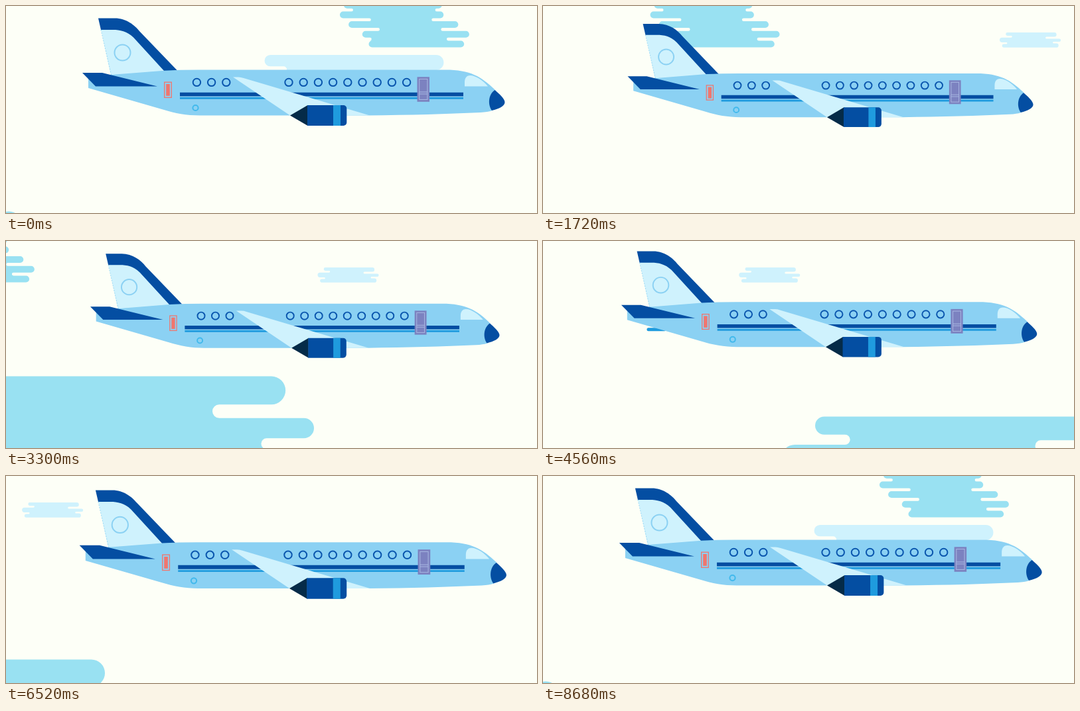
An HTML page with a canvas that plays this animation: 800x313 px, repeating every 8.7 s.

```html
<!DOCTYPE html>
<html lang="en">
<head>
<meta charset="utf-8">
<title>Plane in flight</title>
<style>
html, body { margin: 0; width: 100%; height: 100%; overflow: hidden; background: #fdfff7; }
canvas { display: block; }
</style>
</head>
<body>
<canvas id="stage" width="800" height="313"></canvas>
<script>
const ctx = document.getElementById('stage').getContext('2d');
const LOOP = 8700, TURN = Math.PI / 2;
const SKY = '#8bd1f3', NAVY = '#044ea2', BLUE = '#1f9bde', PALE = '#cff2fd', AQUA = '#99e1f2';

// Signed distance from a moment, wrapped around the loop
const since = (t, at) => ((t - at + LOOP * 1.5) % LOOP) - LOOP / 2;

// Each side lists [edge x, height] from top to bottom, bulges alternating with notches
function cloudShape(right, left) {
  const path = new Path2D();
  let y = 0;
  right.forEach(([x, h], i) => {
    const r = h / 2, notch = i % 2 === 1;
    path.arc(notch ? x + r : x - r, y + r, r, -TURN, TURN, notch);
    y += h;
  });
  [...left].reverse().forEach(([x, h], i) => {
    const r = h / 2, notch = i % 2 === 1;
    y -= h;
    path.arc(notch ? x - r : x + r, y + r, r, TURN, notch ? -TURN : 3 * TURN, notch);
  });
  path.closePath();
  return path;
}

// Five even rows whose ends swing along a cosine
function raggedShape() {
  const right = [], left = [];
  for (let i = 0; i < 5; i++) {
    const r = 174 - 22 * Math.cos(Math.PI * (i - 0.4) / 2.8);
    const l = 22 - 22 * Math.cos(Math.PI * (i - 0.8) / 3.2);
    right.push([r, 10.1]);
    left.push([l, 10.1]);
    if (i < 4) {
      right.push([r - 10 - 8 * i, 4.6]);
      left.push([l + 14 + 38 * Math.sin(Math.PI * i / 3), 4.6]);
    }
  }
  return cloudShape(right, left);
}

const ragged = raggedShape();
const puff = cloudShape(
  [[279, 21], [225, 10], [300, 15], [261, 8], [289, 20]],
  [[30, 16], [61, 9], [0, 24], [37, 8], [12, 17]]);

// x is the left edge at the moment `at`; speed in px per ms
const behind = [
  { shape: ragged, color: AQUA, at: 0, x: 502.5, y: -6.4, speed: 0.1985 },
  { shape: puff, color: PALE, at: 4135, x: 354, y: 40, speed: 0.1383, size: 0.307 },
  { shape: puff, color: PALE, at: 0, x: 357, y: 74, speed: 0.95, size: 1.084 }
];
const ahead = [
  { shape: puff, color: SKY, at: 5820, x: 191, y: 10.5, speed: 1.3 },
  { shape: puff, color: AQUA, at: 3300, x: -148, y: 204.5, speed: 1.6, size: 2.04 },
  { shape: puff, color: AQUA, at: 4560, x: 359, y: 265.5, speed: 1.6, size: 1.7 },
  { shape: puff, color: AQUA, at: 5820, x: 725, y: 277.5, speed: 1.6, size: 1.95 }
];

// Key plane poses: time, x, y, scale
const poses = [
  [0, 0, 0, 1], [1720, 17.1, 9.3, 0.96], [3300, 15.6, 1.4, 0.9686],
  [4560, 4.8, -2.7, 0.984], [5820, -4, 1.5, 1], [7500, -5.3, 3.2, 1.0204]
];

// Smooth periodic curve through the key poses
function poseAt(t) {
  const n = poses.length;
  const key = i => {
    const [at, ...pose] = poses[(i + n) % n];
    return [at + Math.floor(i / n) * LOOP, ...pose];
  };
  const i = poses.findLastIndex(p => p[0] <= t);
  const [a, b, c, d] = [key(i - 1), key(i), key(i + 1), key(i + 2)];
  const span = c[0] - b[0], u = (t - b[0]) / span, v = 1 - u;
  return [1, 2, 3].map(k => {
    const m0 = (c[k] - a[k]) / (c[0] - a[0]) * span;
    const m1 = (d[k] - b[k]) / (d[0] - b[0]) * span;
    return v * v * (b[k] * (1 + 2 * u) + m0 * u) + u * u * (c[k] * (1 + 2 * v) - m1 * v);
  });
}

function fill(color, d) {
  ctx.fillStyle = color;
  ctx.fill(new Path2D(d));
}
function box(color, x, y, w, h, radii = 0) {
  ctx.fillStyle = color;
  ctx.beginPath();
  ctx.roundRect(x, y, w, h, radii);
  ctx.fill();
}
function frame(color, x, y, w, h, line = 1) {
  ctx.strokeStyle = color;
  ctx.lineWidth = line;
  ctx.strokeRect(x, y, w, h);
}
function ring(color, x, y, r) {
  ctx.strokeStyle = color;
  ctx.lineWidth = 2;
  ctx.beginPath();
  ctx.arc(x, y, r, 0, 4 * TURN);
  ctx.stroke();
}

function drawCloud(c, t) {
  const size = c.size || 1;
  ctx.save();
  ctx.translate(c.x - c.speed * since(t, c.at), c.y);
  ctx.scale(size, size);
  ctx.fillStyle = c.color;
  ctx.fill(c.shape);
  ctx.restore();
}

// Wind streaks slip out from behind the plane and shrink away
function drawStreaks(t) {
  for (let i = 0; i < 7; i++) {
    const dt = since(t, 4780 + 490 * i);
    const len = 16 - dt * 0.06, h = Math.min(5, len);
    if (dt < -400 || len <= 0) continue;
    const y = 85 + 80 * ((0.61 + 0.618 * i) % 1);
    box(BLUE, 105 - dt * 0.3 - len / 2, y - h / 2, len, h, h / 2);
  }
}

function drawPlane(t) {
  const [x, y, size] = poseAt(t);
  ctx.save();
  ctx.translate(x, y);
  ctx.scale(size, size);

  // Fin
  fill(PALE, 'M143 35H160C170 35 182 38 192 47L240 99 158 105Z');
  fill(NAVY, 'M139 18.5H164C181 18.5 194 29 201 38L258 97.5 238.5 98.5 192 47.5C182 38 172 36 161 36H143Z');
  ctx.setLineDash([2, 2]);
  ctx.strokeStyle = SKY;
  ctx.lineWidth = 0.8;
  ctx.stroke(new Path2D('M143 36L158.5 104'));
  ctx.setLineDash([]);
  ring(SKY, 175.5, 70.5, 12);

  // Fuselage
  fill(SKY, 'M124 110L158 104 238 97.7Q262 96.5 290 96.5H662C700 96.5 716 107 736 126' +
    'L745 140 732 158.3Q726 160.3 715 161Q640 164.5 545 165.5H292' +
    'C272 165.5 254 162 238 157L124 124Z');
  fill(NAVY, 'M115 101H145L228 121.5H135Z');
  fill(PALE, 'M691 121.5V115C691 108 695 105 699 105C708 105 719 113 726 121.5Z');
  fill(NAVY, 'M736.5 127C726 134 726 150 732 158C743 155.5 751.5 151 751.5 145.5C751.5 140 742 132 736.5 127Z');

  box(NAVY, 262, 130.7, 427, 5.8);
  box(BLUE, 262, 138, 427, 2.8);
  for (let i = 0; i < 12; i++) {
    ring('#0a56ae', (i < 3 ? 287.4 : 359.4) + 22.2 * i, 115.4, 5.7);
  }
  ring('#41b9ec', 285.5, 154, 4.1);

  // Doors
  frame('#f0766e', 238.7, 115.2, 10.6, 23.2, 1.3);
  box('#f0766e', 241.2, 118, 5.6, 17.8);
  box('#7c82c0', 619.5, 107.3, 18.5, 37.5);
  frame('#a9b8e2', 622.7, 110.5, 12.2, 31);
  box('#a9b8e2', 622.7, 129.5, 12.2, 1);
  box('#a9b8e2', 622.7, 132.5, 12.2, 1);

  // Wing and engine
  fill(PALE, 'M342 107.5H350Q354 107.5 358 109L548 165.5H428Z');
  fill('#052b48', 'M428 165.5L454.5 150V181Z');
  box(NAVY, 454, 150, 59.3, 31, [0, 5, 5, 0]);
  box(BLUE, 493, 150, 11, 31);
  ctx.restore();
}

// Rim of a cloud that just grazes the bottom corner
function drawCorner(t) {
  const drop = (since(t, 8690) / 300) ** 2;
  box(AQUA, -16, 310.5 + drop, 40, 40, 20);
}

function draw(t) {
  box('#fdfff7', 0, 0, 800, 313);
  behind.forEach(c => drawCloud(c, t));
  drawStreaks(t);
  drawPlane(t);
  ahead.forEach(c => drawCloud(c, t));
  drawCorner(t);
}

let start;
function tick(now) {
  start ??= now;
  draw((now - start) % LOOP);
  requestAnimationFrame(tick);
}
requestAnimationFrame(tick);
</script>
</body>
</html>
```
